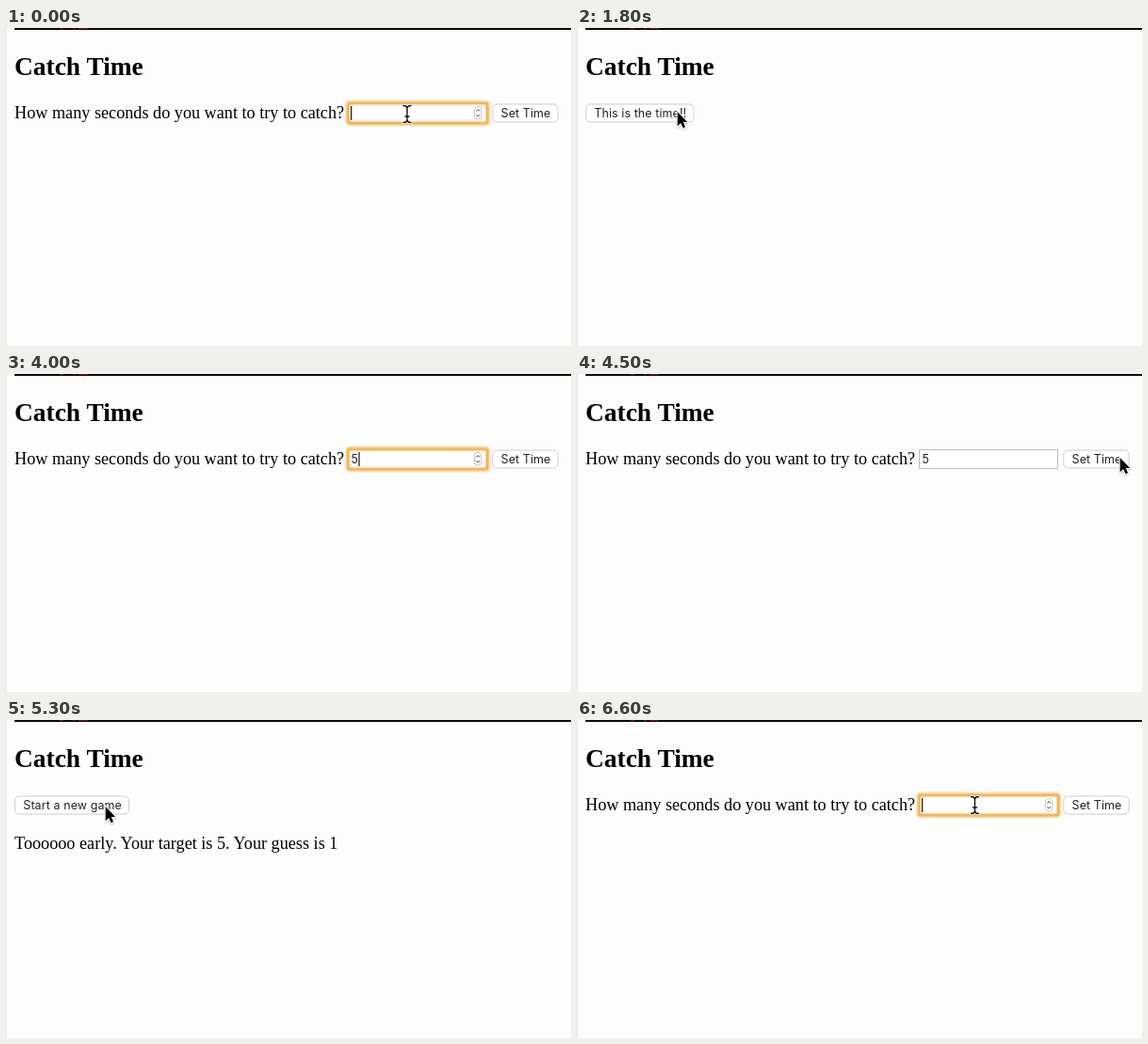
An HTML page for the animation above (6.8 s loop, 600 px wide and 338 px high).

```html
<!DOCTYPE html>
<html lang="en">
<head>
<meta charset="utf-8">
<title>Catch Time</title>
<style>
  html, body { margin: 0; width: 100%; height: 100%; overflow: hidden; background: #fefdfe; }
  svg { display: block; width: 600px; height: 338px; }
  text { font: 18.2px "Liberation Serif", serif; white-space: pre; }
  .title { font-size: 27.4px; font-weight: bold; }
  .ui { font: 12.46px Inter, sans-serif; letter-spacing: .1px; fill: #222; }
</style>
</head>
<body>
<svg viewBox="0 0 600 338">
  <defs>
    <filter id="soft" x="-10%" y="-50%" width="120%" height="200%"><feGaussianBlur stdDeviation=".9"/></filter>
    <path id="stem" d="M-4-9Q-.5-9 0-6.5Q.5-9 4-9M0-6.5V6.5M-4 9Q-.5 9 0 6.5Q.5 9 4 9M-2 2.5H2"/>
    <path id="tip" d="M.7 1V16.2L4.2 12.9 6.6 18.2 9 17.2 6.8 12H11.2Z"/>
  </defs>
  <path d="M.5 0V338" stroke="#ececec"/>
  <path d="M9 0H600V2H9Z" fill="#0a0a0a"/>
  <path d="M57 .5h4M71 .5h3m3 0h10" stroke="#8c1020"/>
  <text class="title" x="9.07" y="50">Catch Time</text>

  <g id="form">
    <text x="9.07" y="96">How many seconds do you want to try to catch?</text>
    <rect x="363.5" y="80.5" width="147" height="20" fill="#fff" stroke="#bdbdc1"/>
    <g id="focus">
      <rect x="363" y="79.5" width="148.5" height="22" rx="2" fill="none" stroke="#f3b04a" stroke-width="3.6" filter="url(#soft)"/>
      <rect x="497.5" y="83.5" width="7.5" height="13.5" rx="3.5" fill="#fff" stroke="#c4c4c4"/>
      <path d="M499.5 88.5l1.8-2 1.8 2m-3.6 3.6l1.8 2 1.8-2" fill="none" stroke="#444"/>
      <path id="caret" d="M0 83V98" stroke="#111" stroke-width="1.2"/>
    </g>
    <text id="digit" class="ui" x="366.5" y="95.4"></text>
  </g>

  <g id="button">
    <rect id="face" y="81" width="1" height="19" rx="4.5" fill="#fff" stroke="#cdcdcd"/>
    <text id="label" class="ui" x="8.8" y="95.4"></text>
  </g>
  <text id="result" x="9.07" y="137.4"></text>

  <g id="arrow">
    <use href="#tip" y="1" stroke="#000" stroke-width="2" opacity=".25" filter="url(#soft)"/>
    <use href="#tip" stroke="#fff" stroke-width="2"/>
    <use href="#tip"/>
  </g>
  <g id="beam" fill="none" stroke-linecap="round">
    <use href="#stem" stroke="#fff" stroke-width="3.2"/>
    <use href="#stem" stroke="#111" stroke-width="1.4"/>
  </g>
</svg>
<script>
const LOOP = 6800, STEP = 100;
const el = id => document.getElementById(id);
const show = (id, on) => el(id).setAttribute('visibility', on ? 'inherit' : 'hidden');
const place = (id, x, y) => el(id).setAttribute('transform', `translate(${x} ${y})`);

// Each round: form, focus, typed digit, click, running game, stop
const rounds = [
  { start: 0, focus: 0, type: 300, click: 900, game: 1100, stop: 2000, target: 3, guess: 2 },
  { start: 2700, focus: 3300, type: 4000, click: 4500, game: 4600, stop: 5300, target: 5, guess: 1 },
  { start: 6200, focus: 6600 }
];
const labels = { form: 'Set Time', game: 'This is the time!!', result: 'Start a new game' };

// Each pointer move sets off where the previous one ended, and bows upward by lift
const home = { x: 426, y: 91.5 };
const moves = [
  { from: 400, to: 900, x: 569, y: 84, lift: 75 },
  { from: 1100, to: 1800, x: 106, y: 88, lift: -16 },
  { from: 2700, to: 3500, x: 496, y: 87, lift: 7 },
  { from: 4000, to: 4500, x: 576, y: 88, lift: 36 },
  { from: 4500, to: 5300, x: 105, y: 91, lift: 13 },
  { from: 5300, to: 5500, x: 183, y: 95, lift: 0 },
  { from: 5500, to: 6000, x: 114, y: 89, lift: 0 },
  { from: 6200, to: 6600, x: 422.5, y: 90.5, lift: 32 }
];

function pointerAt(t) {
  let { x, y } = home;
  for (const move of moves) {
    if (t < move.from) break;
    const left = 1 - Math.min(1, (t - move.from) / (move.to - move.from));
    const k = 1 - left * left;
    x += (move.x - x) * k;
    y += (move.y - y) * k - move.lift * Math.sin(Math.PI * k);
  }
  return [x, y];
}

function draw(t) {
  const round = rounds.findLast(r => r.start <= t);
  const page = t >= round.stop ? 'result' : t >= round.game ? 'game' : 'form';
  const form = page === 'form';
  const typed = t >= round.type;
  const focused = form && t >= round.focus && !(t >= round.click);
  const blink = t % 1200;

  show('form', form);
  show('focus', focused);
  show('caret', focused && (blink < 100 || blink >= 300));
  place('caret', typed ? 375 : 366.7, 0);
  el('digit').textContent = typed ? round.target : '';

  el('label').textContent = labels[page];
  el('face').setAttribute('width', el('label').getComputedTextLength() + 16.5);
  place('button', form ? 516.8 : 9.5, 0);
  el('result').textContent = page === 'result'
    ? `Toooooo early. Your target is ${round.target}. Your guess is ${round.guess}` : '';

  const [x, y] = pointerAt(t);
  const hidden = typed && t < round.type + 200;
  const overText = form && x > 120 && x < 512 && y > 77;
  show('arrow', !hidden && !overText);
  show('beam', !hidden && overText);
  place('arrow', x, y);
  place('beam', x, y);
}

function tick() {
  draw(Math.floor(performance.now() % LOOP / STEP) * STEP);
  requestAnimationFrame(tick);
}
tick();
</script>
</body>
</html>
```
